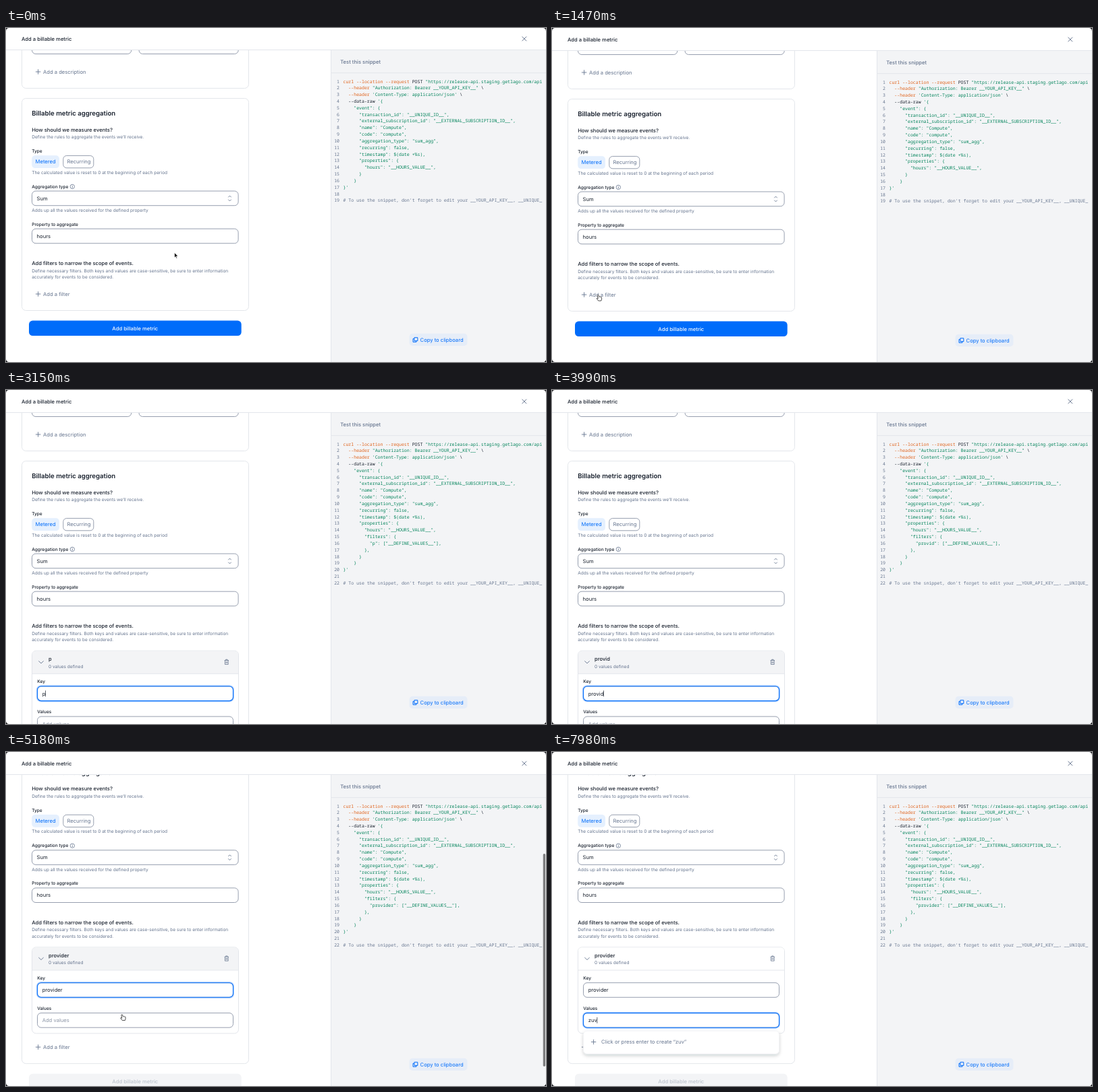
An HTML page for the animation above (8 s loop, 800 px wide and 496 px high).

```html
<!DOCTYPE html>
<html lang="en">
<head>
<meta charset="utf-8">
<title>Add a billable metric</title>
<style>
html, body { margin: 0; width: 100%; height: 100%; overflow: hidden; background: #1b1c20; }
svg { display: block; font-family: Inter, sans-serif; font-size: 7.645px; text-rendering: geometricPrecision; }
text { white-space: pre; }
.code { font-family: "Noto Sans Mono", "Liberation Mono", monospace; font-size: 6.55px; }
</style>
</head>
<body>
<svg id="stage" width="800" height="496" viewBox="0 0 800 496"></svg>
<script>
const INK = '#19212e', GREY = '#66758f', HINT = '#8c95a6', LINE = '#e3e6eb',
  BLUE = '#006cfa', PALE = '#f3f4f6', ORANGE = '#e0651f', GREEN = '#00835a';
const LOOP = 8000, SCROLL = 97.3;

// ---- markup helpers
const esc = s => s.replace(/&/g, '&amp;').replace(/</g, '&lt;');
const text = (x, y, s, fill = INK, weight = 400, extra = '') =>
  `<text x="${x}" y="${y}" fill="${fill}" font-weight="${weight}" ${extra}>${esc(s)}</text>`;
const small = (x, y, s, fill = GREY, weight = 400, extra = '') =>
  text(x, y, s, fill, weight, 'font-size="6.55" ' + extra);
const box = (x, y, w, h, r, fill, stroke = 'none', extra = '') =>
  `<rect x="${x}" y="${y}" width="${w}" height="${h}" rx="${r}" fill="${fill}" stroke="${stroke}" ${extra}/>`;
const path = (d, stroke = GREY, width = 0.9, extra = '') =>
  `<path d="${d}" fill="none" stroke="${stroke}" stroke-width="${width}" ${extra}/>`;
const plus = (x, y) => path(`M${x - 3.7} ${y}h7.4M${x} ${y - 3.7}v7.4`);
const field = (x, y, w, id = '') => box(x, y, w, 21.6, 5.5, '#fff', HINT, `stroke-width=".9" id="${id}"`);
const ring = (id, y) => `<g id="${id}">` +
  box(45.6, y - 0.9, 291.8, 23.4, 6.2, 'none', '#b8d5fe', 'stroke-width="1.6"') +
  box(46.5, y, 290, 21.6, 5.5, 'none', BLUE, 'stroke-width="1.1"') + '</g>';
const caret = id => box(0, 0, 0.7, 9, 0, INK, 'none', `id="${id}"`);

// ---- static parts
const topCard = box(23.5, -40, 336, 130.5, 6, '#fff', LINE) +
  field(38.5, 17.9, 147.2) + field(197, 17.9, 147.2) +
  plus(47.6, 66) + text(55, 68.7, 'Add a description', GREY);

const form =
  text(38.2, 131, 'Billable metric aggregation', INK, 600, 'font-size="9.6"') +
  text(38.2, 154.7, 'How should we measure events?', INK, 500) +
  small(38.2, 165.4, 'Define the rules to aggregate the events we’ll receive.') +
  small(38.2, 186.3, 'Type', INK, 500) +
  box(38.2, 190.3, 40.8, 18.8, 5, '#e5f0fe') + text(43.6, 202.3, 'Metered', BLUE) +
  box(84.8, 190.6, 45, 18.2, 5, '#fff', HINT, 'stroke-width=".9"') + text(90.4, 202.3, 'Recurring', GREY) +
  small(38.2, 217.8, 'The calculated value is reset to 0 at the beginning of each period') +
  small(38.2, 238.7, 'Aggregation type', INK, 500) +
  `<circle cx="98.3" cy="236.5" r="3.2" fill="none" stroke="${GREY}" stroke-width=".8"/>` +
  path('M98.3 234.6v.9M98.3 236.1v2.3') +
  field(38.5, 243.1, 305.6) + text(45.6, 256.8, 'Sum') +
  path('M329.3 252.3l2.2-2.2l2.2 2.2M329.3 255.7l2.2 2.2l2.2-2.2') +
  small(38.2, 274, 'Adds up all the values received for the defined property') +
  small(38.2, 294.7, 'Property to aggregate', INK, 500) +
  field(38.5, 299.2, 305.6) + text(45.6, 312.8, 'hours') +
  text(38.2, 352.9, 'Add filters to narrow the scope of events.', INK, 500) +
  small(38.2, 363.8, 'Define necessary filters. Both keys and values are case-sensitive, be sure to enter information') +
  small(38.2, 373.4, 'accurately for events to be considered.');

const filter = `<g id="filter">` +
  box(38.5, 387.2, 306, 128, 6, '#fff', LINE, 'id="filterBox"') +
  `<path id="filterHead" d="M39 421V393q0-5.300 5.300-5.300H338.700q5.300 0 5.300 5.300V421z"/>` +
  path('M48.300 402.400l3.700 3.500l3.700-3.500') +
  text(63, 402, '', INK, 500, 'id="filterName"') + small(63, 412.8, '0 values defined') +
  path('M323.600 401.500h6.400M325.600 401.300v-1.100h2.400v1.100M324.400 401.600v5.900h4.800v-5.900M326 403.200v2.700M327.600 403.200v2.700', GREY, 0.8) +
  `<g clip-path="url(#bodyClip)">` + path('M39 421.300H344', LINE, 1) +
  small(46.300, 435.400, 'Key', INK, 500) + field(46.500, 440, 290) + ring('keyRing', 440) +
  text(53.700, 453.600, '', INK, 400, 'id="keyText"') + caret('keyCaret') +
  small(46.300, 480, 'Values', INK, 500) + field(46.500, 484.900, 290) + ring('valRing', 484.900) +
  text(53.700, 498.500, '', INK, 400, 'id="valText"') + caret('valCaret') + '</g></g>';

const menu = `<g id="menu">` +
  box(46.500, 511.500, 290, 34, 5.500, '#fff', '#eef0f3', 'filter="url(#shade)" stroke-width=".6"') +
  plus(61.600, 527.900) + text(73, 530.600, '', GREY, 400, 'id="menuText"') + '</g>';

const side = box(481.500, 33, 320, 480, 0, PALE) + path('M481.500 34V510M481.500 67.700H800', LINE, 1) +
  text(495.200, 53.500, 'Test this snippet', GREY, 500) + '<g id="code" class="code"></g>' +
  box(597.500, 454.700, 86, 18.200, 5, '#e6edf8') + text(613.600, 466.500, 'Copy to clipboard', BLUE) +
  path('M604.900 460.700h4.900v4.900h-4.900zM604.700 462.400h-1.700v4.900h4.900v-1.600', BLUE, 1);

document.getElementById('stage').innerHTML = `
<defs>
  <clipPath id="view"><rect x="0" y="34" width="800" height="480"/></clipPath>
  <clipPath id="bodyClip"><rect id="bodyRect" x="38" y="387" width="308" height="129"/></clipPath>
  <clipPath id="round"><rect width="800" height="496" rx="4.500"/></clipPath>
  <filter id="shade" x="-10%" y="-40%" width="120%" height="200%">
    <feDropShadow dx="0" dy="2.500" stdDeviation="2.500" flood-color="#19212e" flood-opacity=".2"/></filter>
</defs>
<g clip-path="url(#round)"><rect width="800" height="496" fill="#fff"/>
<g id="page">
  <g clip-path="url(#view)"><g id="scroll">${topCard}
    ${box(23.500, 105.500, 336, 315, 6, '#fff', LINE, 'id="card"')}${form}${filter}
    <g id="after">${plus(47.600, 396)}${text(55, 398.700, 'Add a filter', GREY)}
      ${box(34, 435.600, 314.700, 22.500, 5.500, BLUE, 'none', 'id="submit"')}
      ${text(191.300, 449.600, 'Add billable metric', '#fff', 500, 'text-anchor="middle" id="submitText"')}</g>
    ${menu}</g></g>
  ${side}
  ${text(23, 19.600, 'Add a billable metric', INK, 500)}
  ${path('M0 33.500H800', LINE, 1)}${path('M764.500 13.700l6.600 6.600m0-6.600l-6.600 6.600', GREY, 1)}
  ${box(795.700, 0, 3.400, 316, 1.700, '#7b7b7d', 'none', 'id="thumb"')}
  <g id="keycap">${box(378, 417.300, 44, 33, 7, '#434343')}
    ${path('M391 433.800h14m-4.500-4.500l4.500 4.500l-4.500 4.500M408.300 428v11.600', '#fff', 1.700)}</g>
</g>
<g id="arrow"><path d="M0 0V7.600L1.800 6L3 8.700L4.200 8.200L3 5.500H5.400z" fill="#111" stroke="#fff" stroke-width=".7"/></g>
<g id="hand"><path d="M-.9.200q.9-.800 1.500.200L1.300 2.800q.8-.600 1.300.1q.8-.500 1.300.200q1-.2 1.100.8L5.100 6.100L4.300 8.600H.3L-2.100 5.600q-.5-1.200.9-.9L-.2 5.300L-1.100 1.200z"
  fill="#fff" stroke="#222" stroke-width=".8" stroke-linejoin="round"/></g>
</g>`;

// ---- motion helpers
const $ = id => document.getElementById(id);
const set = (id, attrs) => { for (const k in attrs) $(id).setAttribute(k, attrs[k]); };
const show = (id, on) => set(id, { opacity: +on });
const ramp = (t, a, b) => Math.min(1, Math.max(0, (t - a) / (b - a)));
const ease = (t, a, b) => { const p = ramp(t, a, b); return p * p * (3 - 2 * p); };
const out = (t, a, b) => 1 - (1 - ramp(t, a, b)) ** 3;
const mix = (a, b, p) => a + (b - a) * p;

const KEY = 'provider', KEY_AT = [2940, 3220, 3710, 3780, 3920, 3990, 4200, 4480];
const VALUE = 'zuv', VALUE_AT = [7210, 7490, 7700];
const ADDED = 1610, TABBED = 5600;

const typed = (word, times, t) => word.slice(0, times.filter(at => at <= t).length);
const blink = (t, start, times) => {
  const last = Math.max(start, ...times.filter(at => at <= t));
  return Math.floor((t - last) / 525) % 2 === 0;
};

// ---- code snippet
const tspan = ([fill, s]) => `<tspan fill="${fill}">${esc(s)}</tspan>`;
let shownKey = null;
function drawCode(added, key) {
  const state = added + key;
  if (state === shownKey) return;
  shownKey = state;
  const green = (n, s) => [[GREEN, ' '.repeat(n) + s]];
  const lines = [
    [[ORANGE, 'curl --location --request'], [INK, ' POST '], [GREEN, '"https://release-api.staging.getlago.com/api']],
    [[ORANGE, '  --header '], [GREEN, '"Authorization: Bearer __YOUR_API_KEY__"'], [INK, ' \\']],
    [[ORANGE, '  --header '], [GREEN, "'Content-Type: application/json'"], [INK, ' \\']],
    [[INK, '  --data-raw '], [GREEN, "'{"]],
    green(4, '"event": {'),
    green(6, '"transaction_id": "__UNIQUE_ID__",'),
    green(6, '"external_subscription_id": "__EXTERNAL_SUBSCRIPTION_ID__",'),
    green(6, '"name": "Compute",'),
    green(6, '"code": "compute",'),
    green(6, '"aggregation_type": "sum_agg",'),
    green(6, '"recurring": false,'),
    green(6, '"timestamp": $(date +%s),'),
    green(6, '"properties": {'),
    green(8, '"hours": "__HOURS_VALUE__",'),
    ...(added ? [green(8, '"filters": {'),
      green(10, `"${key || '__DEFINE_A_KEY__'}": ["__DEFINE_VALUES__"],`),
      green(8, '},')] : []),
    green(6, '}'), green(4, '}'), green(0, "}'"), [],
    [[GREY, "# To use the snippet, don't forget to edit your __YOUR_API_KEY__, __UNIQUE_"]]
  ];
  $('code').innerHTML = lines.map((parts, i) => {
    const y = (82.5 + i * 9.83).toFixed(2);
    return text(494, y, String(i + 1), GREY, 400, 'text-anchor="end"') +
      `<text x="499.500" y="${y}">${parts.map(tspan).join('')}</text>`;
  }).join('');
}

function drawField(name, x, y, word, hint, focus, caretOn) {
  const el = $(name + 'Text');
  el.textContent = word || hint;
  el.setAttribute('fill', word ? INK : HINT);
  show(name + 'Ring', focus);
  const w = word ? el.getComputedTextLength() : 0;
  set(name + 'Caret', { x: x + w, y: y, opacity: +(focus && caretOn) });
}

function drawCursor(t) {
  const go = ease(t, 30, 460), drift = ease(t, 1050, 1470), back = ease(t, 4620, 4900);
  const x = mix(mix(mix(249.5, 84.5, go), 68.5, drift), 172, back);
  const y = mix(mix(mix(333.5, 391.5, go), 396.5, drift), 390, back);
  const visible = t < KEY_AT[0] || (t >= 4620 && t < TABBED);
  const hand = go > 0.9;
  const transform = `translate(${x} ${y})`;
  set('arrow', { transform, opacity: +(visible && !hand) });
  set('hand', { transform, opacity: +(visible && hand) });
}

function draw(t) {
  const added = t >= ADDED, tabbed = t >= TABBED;
  const key = typed(KEY, KEY_AT, t), value = typed(VALUE, VALUE_AT, t);
  const grow = ease(t, ADDED, 1930);
  const height = added ? mix(34, 128, grow) : 0;
  const push = added ? height + 11.5 : 0;
  const scroll = SCROLL * out(t, 4690, 5180);

  set('page', { transform: `translate(0 ${ease(t, 70, 350) - 1})` });
  set('scroll', { transform: `translate(0 ${-scroll})` });
  set('card', { height: 315 + push });
  set('after', { transform: `translate(0 ${push})` });
  set('submit', { fill: added ? PALE : BLUE });
  set('submitText', { fill: added ? '#bcc3cd' : '#fff' });

  show('filter', added);
  set('filterBox', { height });
  set('bodyRect', { height: Math.max(0, height) });
  set('filterHead', { fill: t < 5460 ? PALE : '#fff' });
  $('filterName').textContent = key || 'Filter';
  drawField('key', 53.5, 446.3, key, 'Type a key', added && !tabbed, blink(t, 1680, KEY_AT));
  drawField('val', 53.5, 491.2, value, 'Add values', tabbed, blink(t, TABBED, VALUE_AT));

  show('menu', value);
  if (!value) set('menu', { opacity: 0 }); else set('menu', { opacity: 1 });
  $('menuText').textContent = `Click or press enter to create “${value}”`;

  set('thumb', { y: 151 - (SCROLL - scroll) * 0.684, opacity: ramp(t, 4620, 4760) * (1 - ramp(t, 5600, 5950)) });
  show('keycap', ramp(t, 5530, 5670) * (1 - ramp(t, 6860, 7140)) );
  drawCode(added, key);
  drawCursor(t);
}

const start = performance.now();
function tick(now) {
  draw(Math.max(0, now - start) % LOOP);
  requestAnimationFrame(tick);
}
draw(0);
requestAnimationFrame(tick);
</script>
</body>
</html>
```
